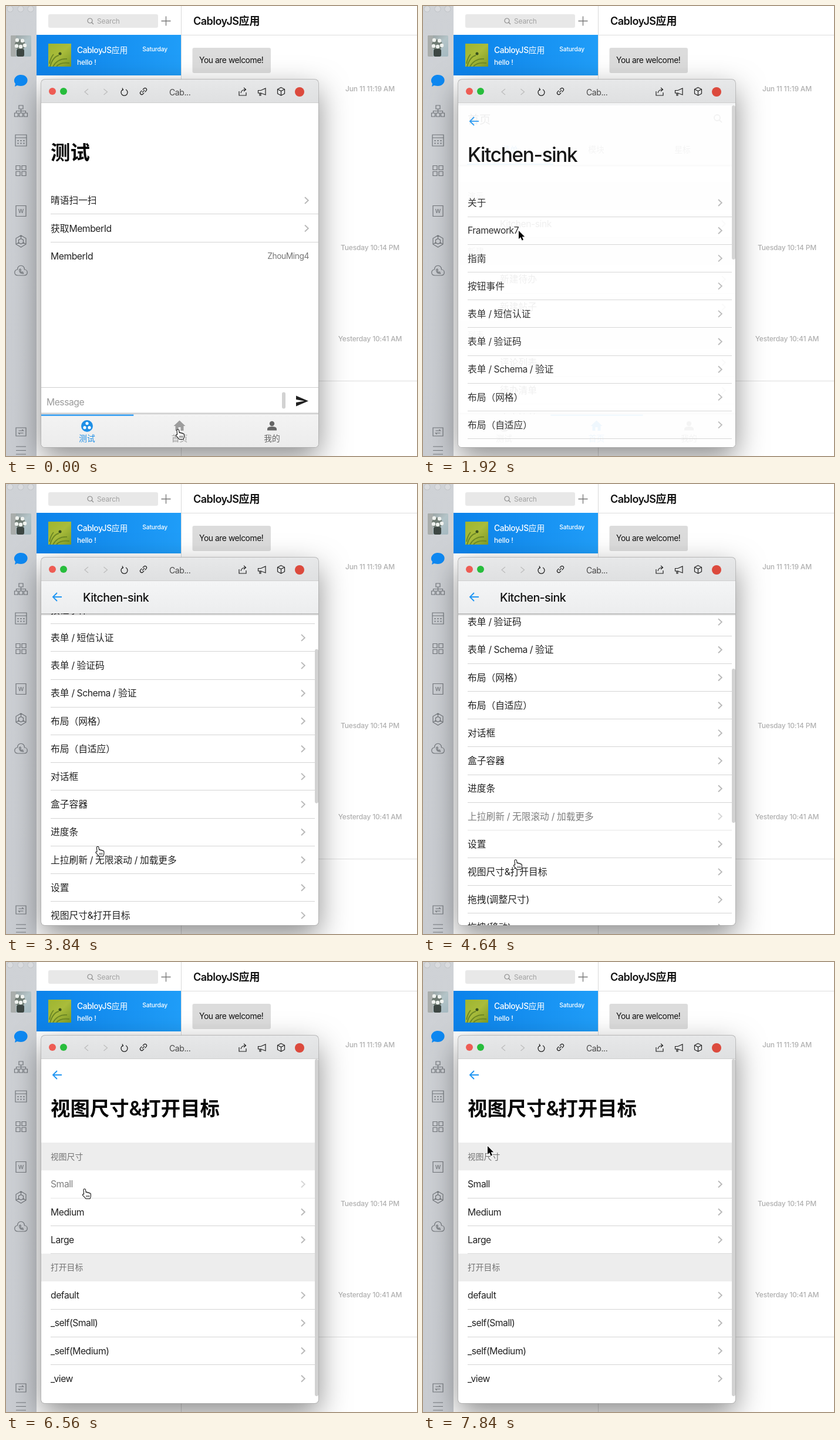
An HTML page with a canvas that plays this animation: 700 px wide and 765 px high, repeating every 8 s.

```html
<!DOCTYPE html>
<html lang="zh">
<head>
<meta charset="utf-8">
<title>Chat client with mini app</title>
<style>
html, body { margin: 0; width: 100%; height: 100%; overflow: hidden; background: #fff; }
canvas { display: block; }
</style>
</head>
<body>
<canvas id="stage" width="700" height="765"></canvas>
<script>
const ctx = document.getElementById('stage').getContext('2d');
const LOOP = 8000, STEP = 160, ROW = 47.2;
const BLUE = '#1f8fe6', INK = '#212121';
const FONT = 'Inter, "Noto Sans CJK SC", "Noto Sans CJK", sans-serif';
const WIN = { x: 60, y: 125, w: 472, h: 625 };

const clamp = v => Math.max(0, Math.min(1, v));
const smooth = p => p * p * (3 - 2 * p);

// Drawing helpers
function rect(x, y, w, h, fill, r = 0) {
  ctx.fillStyle = fill;
  ctx.beginPath();
  ctx.roundRect(x, y, w, h, r);
  ctx.fill();
}
function dot(x, y, r, fill) {
  ctx.fillStyle = fill;
  ctx.beginPath();
  ctx.arc(x, y, r, 0, Math.PI * 2);
  ctx.fill();
}
function path(d, x, y, color, width = 1.2) {
  ctx.save();
  ctx.translate(x, y);
  ctx.strokeStyle = color;
  ctx.lineWidth = width;
  ctx.stroke(new Path2D(d));
  ctx.restore();
}
function shape(d, x, y, color) {
  ctx.save();
  ctx.translate(x, y);
  ctx.fillStyle = color;
  ctx.fill(new Path2D(d));
  ctx.restore();
}
function grad(x0, y0, x1, y1, ...colors) {
  const g = ctx.createLinearGradient(x0, y0, x1, y1);
  colors.forEach((c, i) => g.addColorStop(i / (colors.length - 1), c));
  return g;
}
function faded(alpha, draw) {
  ctx.save();
  ctx.globalAlpha *= alpha;
  draw();
  ctx.restore();
}
function clipped(x, y, w, h, r, draw) {
  ctx.save();
  ctx.beginPath();
  ctx.roundRect(x, y, w, h, r);
  ctx.clip();
  draw();
  ctx.restore();
}
// y is the vertical middle; Latin runs are tracked tighter than CJK
function text(s, x, y, size, color, weight = 400, align = 0) {
  const track = size > 30 ? -0.04 : size > 13 ? -0.03 : -0.015;
  const runs = s.match(/[\x00-\x7f]+|[^\x00-\x7f]+/g).map(str => {
    const gap = str.charCodeAt(0) < 128 ? `${track * size}px` : '0px';
    ctx.font = `${weight} ${size}px ${FONT}`;
    ctx.letterSpacing = gap;
    return { str, gap, w: ctx.measureText(str).width };
  });
  x -= align * runs.reduce((sum, r) => sum + r.w, 0);
  ctx.fillStyle = color;
  for (const r of runs) {
    ctx.letterSpacing = r.gap;
    ctx.fillText(r.str, x, y + size * 0.36);
    x += r.w;
  }
}

// Chat client behind the window
function photo() {
  rect(8, 50, 35, 36, grad(8, 50, 43, 86, '#949c9b', '#b4c4c8', '#a3b8c0'));
  rect(8, 50, 9, 36, '#a9adab');
  dot(24, 66, 9, '#707c74');
  for (const [x, y] of [[19, 58], [28, 59], [32, 67], [18, 68], [25, 69]]) dot(x, y, 3.2, '#eef1ee');
  rect(18, 73, 13, 13, '#3d4743', 3);
}

function sidebar() {
  const c = '#73777c';
  rect(0, 0, 52, 765, grad(0, 0, 0, 765, '#cfd2d6', '#c9ccd1'));
  for (const x of [7, 25, 42]) {
    dot(x, 5, 5.5, '#bfc2c6');
    dot(x, 5, 4.7, '#d9dbde');
  }
  clipped(8, 50, 35, 36, 2, photo);
  shape('M0-10C16-10 15 9 0 9C-3 9-5 8-6 8L-10 10L-9 5C-14-1-9-10 0-10Z', 25, 127, '#0d88f2');
  path('M-3.5-10h7v6h-7zM-11 3h6v6h-6zM-3 3h6v6h-6zM5 3h6v6h-6zM0-4V3M-8 3V-.5H8V3', 25.5, 179, c);
  path('M-9.5-9.5h19v19h-19zM-9.5-4.5h19', 25.5, 228.5, c);
  for (let i = 0; i < 6; i++) rect(19.5 + i % 3 * 5, 228 + (i / 3 | 0) * 4.5, 2, 2, c);
  path('M-8.5-9h7v7h-7zM1.5-9h7v7h-7zM-8.5 1h7v7h-7zM1.5 1h7v7h-7z', 25.5, 280.5, c);
  path('M-8.5-9h17v18h-17z', 25.5, 348.5, c);
  text('W', 25.5, 348.5, 9.5, c, 500, 0.5);
  path('M0-10L8.5-5V5L0 10L-8.5 5V-5ZM0-4.5L4-2.3V2.3L0 4.5L-4 2.3V-2.3ZM0-4.5V-10M4 2.3L8.5 5M-4 2.3L-8.5 5', 25.5, 400, c);
  path('M-5 8C-13 8-12-2-6-2C-6-11 6-11 6-2C12-2 13 8 5 8ZM-3-2Q-3 5 4 5L3 2L1 3Q-1 1-1 0L0-1L-1-3Z', 25.5, 450, c);
  path('M-8.5-7h17v14h-17zM-4-2H4L2-4M4 2H-4L-2 4', 25.5, 724, c);
  path('M-8.5-6.5h17M-8.5 0h17M-8.5 6.5h17', 25.5, 755.5, c);
}

function chat() {
  rect(52, 0, 648, 765, '#fff');
  rect(72, 14, 187, 23, '#e8e8e8', 3);
  path('M4 0A4 4 0 1 1-4 0A4 4 0 1 1 4 0M3 3L6 6', 143, 25, '#8c8c8c', 1.2);
  text('Search', 155, 25.5, 12, '#a2a2a2');
  path('M-8 0H8M0-8V8', 272.5, 25.5, '#777', 1.3);
  rect(298, 0, 1, 765, '#dadada');

  rect(52, 49, 246, 69, grad(52, 0, 298, 0, '#0b82ea', '#1f9df8'));
  clipped(72, 64, 39, 39, 0, () => {
    rect(72, 64, 39, 39, grad(72, 64, 111, 103, '#9fb52f', '#a9bc3b', '#7f9b26'));
    path('M3 39Q8 22 18 20M8 39Q16 25 32 26M2 34Q4 24 9 18M14 39Q20 31 36 33', 72, 64, '#6b8724', 1.8);
    dot(92, 81, 2.5, '#39511c');
  });
  text('CabloyJS应用', 121, 75, 13.8, '#fff', 500);
  text('hello !', 121, 96, 11.8, '#fff', 500);
  text('Saturday', 275, 73, 10.3, '#fff', 500, 1);

  text('CabloyJS应用', 319, 26, 18, '#111', 600);
  rect(299, 49, 401, 1, '#dedede');
  rect(317.5, 71, 133.5, 43, '#dcdcdc', 3);
  text('You are welcome!', 329, 92, 13.8, '#111');
  text('Jun 11 11:19 AM', 620, 141, 12, '#b0b0b0', 500, 0.5);
  text('Tuesday 10:14 PM', 620, 411, 12, '#b0b0b0', 500, 0.5);
  text('Yesterday 10:41 AM', 620, 565.5, 12, '#b0b0b0', 500, 0.5);
  rect(299, 637, 401, 1, '#dedede');
}

function titleBar() {
  rect(60, 125, 472, 40, grad(0, 125, 0, 165, '#e7e8e9', '#dfe0e1'));
  rect(60, 164, 472, 1, '#cfcfcf');
  dot(79, 145, 6, '#ee5c54');
  dot(98, 145, 6, '#27bd3c');
  path('M3-5L-3 0L3 5', 137, 146, '#bcbcbc');
  path('M-3-5L3 0L-3 5', 169.5, 146, '#bcbcbc');
  path('M-2.5-4.5A5.5 5.5 0 1 0 2.5-4.5M-3.5-7L-2-4L-5-2.5', 201.5, 146.5, INK, 1.3);
  ctx.save();
  ctx.translate(234, 145);
  ctx.rotate(-Math.PI / 4);
  path('M-1 2.7H-4A2.7 2.7 0 0 1-4-2.7H-1M1-2.7H4A2.7 2.7 0 0 1 4 2.7H1M-3 0H3', 0, 0, INK, 1.2);
  ctx.restore();
  text('Cab...', 278, 146.5, 14, '#484848');
  path('M-6-1V6H6V1M-3 2Q-2-4 5-4M2-7L5.5-4L2-1', 403, 146, INK);
  path('M-6.5-2.5H-2L6-6V5L-2 2H-6.5ZM-4 2V6H-2V2', 436, 146, INK);
  path('M0-7L6-4V3.5L0 6.5L-6 3.5V-4ZM-6-4L0-1L6-4M0-1V6.5', 468.5, 145.5, INK);
  dot(500, 146, 8, '#dc4a3d');
}

// Mini app parts
function chevron(x, y) {
  path('M-3-5.5L2.8 0L-3 5.5', x, y, '#b9b9b9', 1.9);
}
function row(label, y, o = {}) {
  const left = o.x || 76, right = o.right || 526;
  faded(o.pressed ? 0.58 : 1, () => {
    text(label, left, y, 15.73, INK);
    if (o.value) text(o.value, 516, y, 13.8, '#757575', 400, 1);
    else chevron(right === 526 ? 506 : 512, y);
    if (!o.last) rect(left, Math.round(y + 22.9), right - left, 1, '#d4d4d4');
  });
}
function group(label, y, right = 526) {
  rect(60, y - ROW / 2, right - 60, ROW, '#ededed');
  text(label, 76, y, 13.8, '#737373');
}
function backArrow() {
  path('M8 0H-7M0-7L-7 0L0 7', 87, 192, '#2196f3', 1.9);
}
function largeTitle(label, weight, y = 249) {
  text(label, 76, y, 33.4, '#050505', weight);
}
function scrollThumb(y, h) {
  rect(526, y, 6, h, '#d2d2d2', 3);
}
function navBar(bottom) {
  rect(60, 165, 472, bottom - 165, grad(0, 165, 0, bottom, '#f4f5f6', '#ecedee'));
  rect(60, bottom, 472, 4, grad(0, bottom, 0, bottom + 4, 'rgba(0,0,0,.32)', 'rgba(0,0,0,0)'));
}

const TABS = [['测试', 138], ['首页', 295.5], ['我的', 453]];
function tabIcon(i, x, color) {
  if (i === 0) {
    dot(x, 714, 10, color);
    for (const [dx, dy] of [[0, -4.5], [-4, 2.7], [4, 2.7]]) dot(x + dx, 714 + dy, 2.6, '#fff');
  } else if (i === 1) {
    shape('M0-9.5L10 0H7V8H2V2H-2V8H-7V0H-10Z', x, 714, color);
  } else {
    dot(x, 710, 4.2, color);
    shape('M-8 8V5.5Q-8 1.5 0 1.5Q8 1.5 8 5.5V8Z', x, 713.5, color);
  }
}
function tabBar(active, slide, pressed) {
  rect(60, 690, 472, 4, grad(0, 690, 0, 694, 'rgba(0,0,0,0)', 'rgba(0,0,0,.25)'));
  rect(60, 694, 472, 56, grad(0, 694, 0, 750, '#f3f3f3', '#ececec'));
  TABS.forEach(([label, x], i) => faded(i === pressed ? 0.6 : 1, () => {
    const color = i === active ? BLUE : '#666';
    tabIcon(i, x, color);
    text(label, x, 735.5, 13.8, color, 400, 0.5);
  }));
  rect(60 + 157.3 * slide, 694.5, 157.3, 2.2, '#2196f3');
}

// Pages
function testPage() {
  rect(60, 165, 472, 585, '#fff');
  largeTitle('测试', 600);
  row('晴语扫一扫', 330.5, { right: 532 });
  row('获取MemberId', 378, { right: 532 });
  row('MemberId', 425.3, { value: 'ZhouMing4', last: true });
  rect(60, 648, 472, 1, '#cfcfcf');
  text('Message', 69, 673, 15.7, '#9a9a9a');
  rect(470, 656.5, 6, 28, '#d2d2d2', 3);
  shape('M-10-9L11 0L-10 9V2.5L4 0L-10-2.5Z', 504, 671.5, INK);
}

const HOME = ['#演示', 'Kitchen-sink', '#新建', '新建待办', '新建帖子', '#列表', '评论列表', '待办清单', '文章清单'];
function homePage(pressed) {
  rect(60, 165, 472, 585, '#fff');
  HOME.forEach((label, i) => {
    const y = 323 + i * ROW;
    if (label[0] === '#') group(label.slice(1), y, 532);
    else row(label, y, { x: 131, right: 532, pressed: pressed && i === 1 });
  });
  navBar(270);
  text('首页', 76, 193, 19.66, '#111', 500);
  path('M5 0A5 5 0 1 1-5 0A5 5 0 1 1 5 0M4 4L8 8', 501, 190, '#444', 1.8);
  ['菜单', '模块', '星标'].forEach((s, i) =>
    text(s, 148 + i * 147, 244, 13.8, i ? '#666' : BLUE, 400, 0.5));
  rect(75, 268, 147, 2, '#2196f3');
}

const DEMOS = ['关于', 'Framework7', '指南', '按钮事件', '表单 / 短信认证', '表单 / 验证码',
  '表单 / Schema / 验证', '布局（网格）', '布局（自适应）', '对话框', '盒子容器', '进度条',
  '上拉刷新 / 无限滚动 / 加载更多', '设置', '视图尺寸&打开目标', '拖拽(调整尺寸)', '拖拽(移动)', '拖拽(排序)'];
function demoPage(scroll, pressed) {
  rect(60, 165, 472, 585, '#fff');
  const collapse = clamp(scroll / 51), bottom = 271 - 51 * collapse;
  clipped(60, bottom, 472, 750 - bottom, 0, () => DEMOS.forEach((label, i) => {
    const y = 330.6 + i * ROW - scroll;
    if (y > 190 && y < 790) row(label, y, { pressed: i === pressed });
  }));
  clipped(60, 220, 472, bottom - 220, 0, () => largeTitle('Kitchen-sink', 500, 249 - 51 * collapse));
  faded(collapse, () => {
    navBar(220);
    text('Kitchen-sink', 131, 193, 19.66, '#111', 500);
  });
  backArrow();
  scrollThumb(165 + scroll * 0.449, 262);
}

const VIEWS = ['#视图尺寸', 'Small', 'Medium', 'Large', '#打开目标', 'default', '_self(Small)', '_self(Medium)', '_view'];
function viewPage(pressed) {
  rect(60, 165, 472, 585, '#fff');
  backArrow();
  largeTitle('视图尺寸&打开目标', 600);
  VIEWS.forEach((label, i) => {
    const y = 330.6 + i * ROW;
    if (label[0] === '#') group(label.slice(1), y);
    else row(label, y, { pressed: i === pressed, last: i === VIEWS.length - 1 });
  });
  scrollThumb(165, 573);
}

// Motion: [time, ...values]
const POINTER = [[0, 293, 720], [480, 293, 720], [1440, 163, 382], [2080, 163, 382], [2560, 148, 495],
  [3360, 148, 495], [4000, 158, 639], [4640, 158, 639], [5440, 148, 612], [5760, 148, 612],
  [6400, 134, 386], [6880, 134, 386], [7680, 110, 313]];
const SCROLL = [[2400, 0], [3040, 148], [3520, 258], [4160, 258], [4640, 332], [5120, 366]];
const HAND = [[0, 400], [960, 1800], [2240, 5280], [6080, 7000]];

const within = (t, a, b) => t >= a && t < b;
function track(keys, t) {
  const i = keys.findIndex(k => k[0] > t);
  if (i === 0) return keys[0].slice(1);
  if (i < 0) return keys[keys.length - 1].slice(1);
  const a = keys[i - 1], b = keys[i], p = smooth((t - a[0]) / (b[0] - a[0]));
  return a.slice(1).map((v, j) => v + (b[j + 1] - v) * p);
}
// cubic-bezier(0, .8, .3, 1)
function enterEase(x) {
  let lo = 0, hi = 1;
  for (let i = 0; i < 20; i++) {
    const s = (lo + hi) / 2;
    if (0.9 * s * s + 0.1 * s ** 3 < x) lo = s; else hi = s;
  }
  const u = 1 - lo;
  return 2.4 * u * u * lo + 3 * u * lo * lo + lo ** 3;
}
function enter(t, start, draw) {
  if (t <= start) return;
  const e = t >= start + 250 ? 1 : enterEase((t - start) / 250);
  faded(e, () => {
    ctx.translate(0, 56 * (1 - e));
    draw();
  });
}

function pointer(t) {
  const [x, y] = track(POINTER, t);
  const hand = HAND.some(([a, b]) => within(t, a, b));
  const d = hand
    ? 'M-2 1.5C-2-.8 1.4-.8 1.6 1.5L2.2 5.5Q4 4.6 5 6.2Q6.8 5.2 7.8 7Q10.2 6.4 10.4 9V12Q10.2 14.5 9 16.5H2Q0 13.5-3.2 10.8Q-4.4 8.4-1.4 8.6Z'
    : 'M0 0V14L3.2 11.1L5.6 16.6L8 15.5L5.7 10.2H10.2Z';
  if (hand) {
    shape(d, x, y, '#fff');
    path(d, x, y, '#111', 1.1);
    path('M3 10.5V14M5.2 10.5V14M7.4 10.5V14', x, y, '#222', 0.9);
  } else {
    path(d, x, y, '#fff', 1.8);
    shape(d, x, y, '#000');
  }
}

function app(t) {
  const slide = smooth(clamp((t - 200) / 300));
  const tab = t < 200 ? 0 : 1;
  const scroll = track(SCROLL, t)[0];
  const demoPressed = within(t, 2480, 3360) ? 3 : within(t, 4000, 4960) ? 12 : within(t, 5500, 5900) ? 14 : -1;
  if (t < 2100) {
    tab ? homePage(within(t, 1600, 1900)) : testPage();
    tabBar(tab, slide, tab ? -1 : 1);
  }
  if (t < 5900) enter(t, 1805, () => demoPage(scroll, demoPressed));
  enter(t, 5640, () => viewPage(within(t, 6400, 6880) ? 1 : -1));
}

function draw(t) {
  chat();
  sidebar();
  ctx.save();
  ctx.shadowColor = 'rgba(0,0,0,.45)';
  ctx.shadowBlur = 50;
  ctx.shadowOffsetY = 18;
  rect(WIN.x, WIN.y, WIN.w, WIN.h, '#fff', 6);
  ctx.restore();
  rect(WIN.x - 0.7, WIN.y - 0.7, WIN.w + 1.4, WIN.h + 1.4, '#a9a9a9', 6.5);

  clipped(WIN.x, WIN.y, WIN.w, WIN.h, 6, () => {
    clipped(WIN.x, 165, WIN.w, 585, 0, () => app(t));
    titleBar();
  });
  pointer(t);
}

const begin = performance.now();
function tick() {
  const t = (performance.now() - begin) % LOOP;
  draw(Math.floor(t / STEP) * STEP);
  requestAnimationFrame(tick);
}
tick();
</script>
</body>
</html>
```
